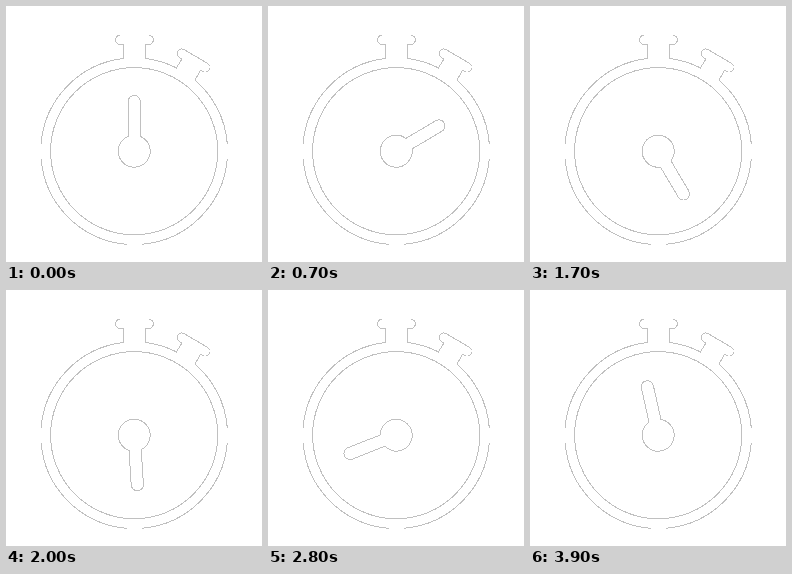
Animation, 256 px wide and 256 px high, one loop 4000 ms. Source, as an HTML page:

```html
<!DOCTYPE html>
<html lang="en">
<head>
<meta charset="utf-8">
<title>Stopwatch</title>
<style>
  html, body { margin: 0; width: 100%; height: 100%; overflow: hidden; background: #fff; }
  svg { display: block; width: 100%; height: 100%; fill: none; stroke: #c0c0c0; shape-rendering: crispEdges; }
</style>
</head>
<body>
<svg viewBox="0 0 256 256">
  <!-- crown, case and side button -->
  <path d="M113.5 29.3A4.5 4.5 0 0 0 115 38.5H117.5V52.5A93.4 93.4 0 0 0 35.1 137.7
           M143.5 29.3A4.5 4.5 0 0 1 142 38.5H139.5V52.5A93.4 93.4 0 0 1 170.4 61.9
           L176 53L173.5 51.6A4.6 4.6 0 0 1 178.1 43.6L201.6 57.4A4.6 4.6 0 0 1 197 65.4
           L194.5 64.2L189 74.1A93.4 93.4 0 0 1 221.3 137.7
           M35.1 152.7A93.4 93.4 0 0 0 120.7 238.3
           M221.3 152.7A93.4 93.4 0 0 1 135.7 238.3"/>
  <circle cx="128.2" cy="145.2" r="83.6"/>
  <path id="hand" d="M122.1 130.4V95.6A6.1 6.1 0 0 1 134.3 95.6V130.4A16 16 0 1 1 122.1 130.4Z"/>
</svg>
<script>
  const LOOP = 4000, STEP = 100;
  const hand = document.getElementById('hand');

  function draw(now) {
    const step = Math.floor((now % LOOP) / STEP);
    // 9° per tick, with a shorter first tick
    const angle = Math.max(0, step * 9 - 3.6);
    hand.setAttribute('transform', `rotate(${angle} 128.2 145.2)`);
    requestAnimationFrame(draw);
  }

  requestAnimationFrame(draw);
</script>
</body>
</html>
```
